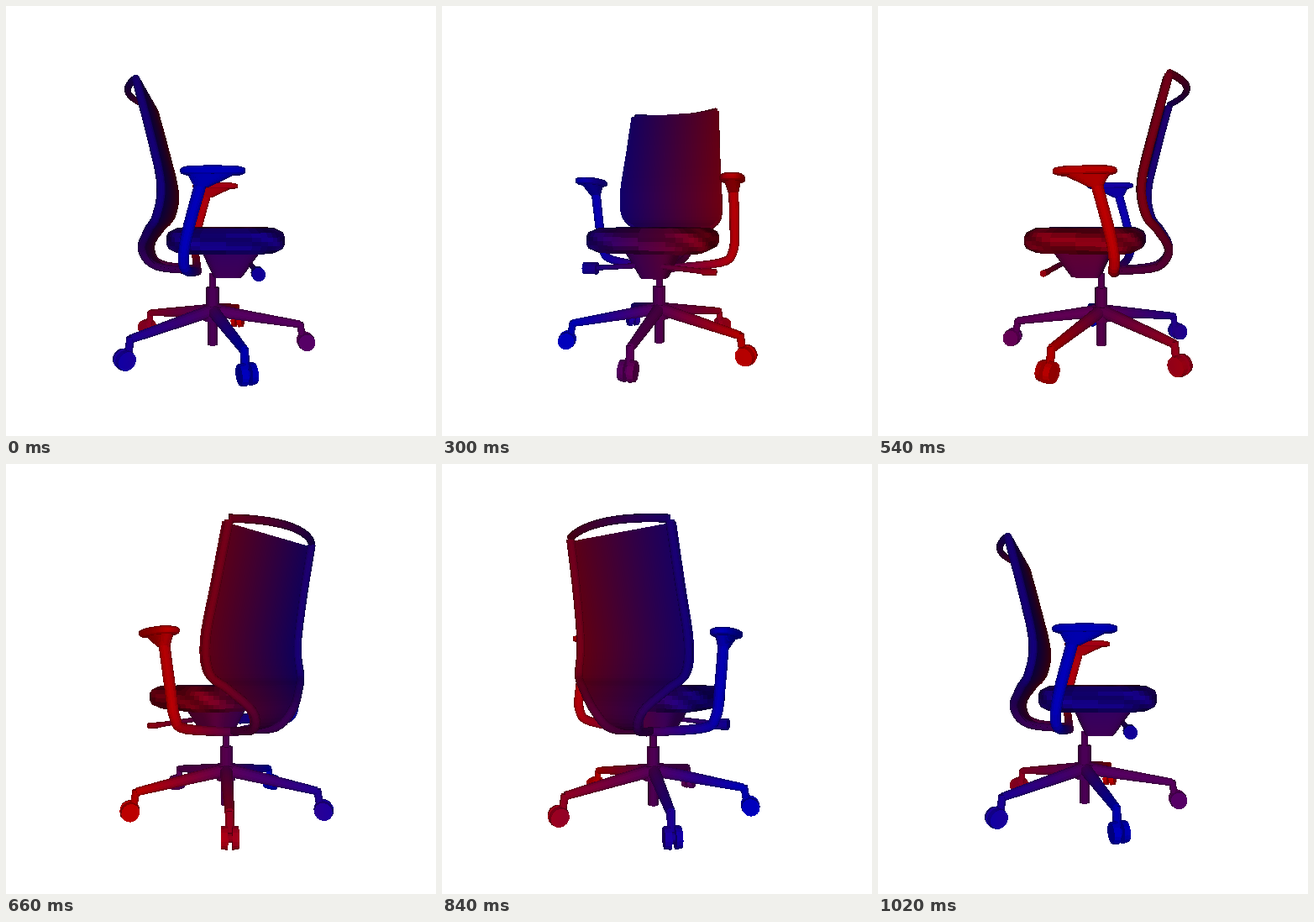
An HTML page with a canvas for the animation above (1080 ms loop, 512 by 512 pixels).

```html
<!DOCTYPE html>
<html>
<head>
<meta charset="utf-8">
<title>Turning office chair</title>
<style>
html, body { margin: 0; width: 100%; height: 100%; overflow: hidden; background: #fff; }
canvas { display: block; width: 512px; height: 512px; }
</style>
</head>
<body>
<canvas id="stage" width="512" height="512"></canvas>
<script>
// Points are [forward, down, side]; the camera sits at seat height.
const SIZE = 512, MID = 256, DIST = 490, STEP = 60, STEPS = 18, TAU = Math.PI * 2;
const ctx = document.getElementById('stage').getContext('2d');
const faces = [];

const sub = (a, b) => a.map((v, i) => v - b[i]);
const dot = (a, b) => a[0] * b[0] + a[1] * b[1] + a[2] * b[2];
const cross = (a, b) => [a[1] * b[2] - a[2] * b[1], a[2] * b[0] - a[0] * b[2], a[0] * b[1] - a[1] * b[0]];
const unit = a => { const n = Math.hypot(...a) || 1; return a.map(v => v / n); };
const mix = (a, b, t) => a + (b - a) * t;
// n + 1 samples of fn over 0..1
const sample = (n, fn) => Array.from({ length: n + 1 }, (_, i) => fn(i / n));

// Catmull-Rom curve through a few key points
function smooth(keys, n = 5) {
  const last = keys.length - 1, key = i => keys[Math.min(last, Math.max(0, i))];
  return sample(n * last, u => {
    const i = Math.min(last - 1, Math.floor(u * last)), t = u * last - i;
    return key(i).map((b, m) => {
      const a = key(i - 1)[m], c = key(i + 1)[m], d = key(i + 2)[m];
      return b + t / 2 * (c - a + t * (2 * a - 5 * b + 4 * c - d + t * (3 * (b - c) + d - a)));
    });
  });
}

function grid(rows, shade, vary = 0) {
  for (let i = 1; i < rows.length; i++)
    for (let j = 1; j < rows[i].length; j++) {
      const a = rows[i - 1][j - 1], b = rows[i - 1][j], c = rows[i][j], d = rows[i][j - 1];
      const k = shade * (1 + vary * Math.sin(i * 1.5 + j * 0.9));
      faces.push({ pts: [a, b, c], k }, { pts: [a, c, d], k });
    }
}

function closed(rings, first, last, shade, vary) {
  grid([rings[0].map(() => first), ...rings, rings[0].map(() => last)], shade, vary);
}

// Round bar along a path, tapering from r0 to r1
function tube(path, r0, r1, shade, ref = [1, 0, 0]) {
  const end = path.length - 1;
  const rings = path.map((p, i) => {
    const dir = unit(sub(path[Math.min(i + 1, end)], path[Math.max(i - 1, 0)]));
    const u = unit(cross(dir, ref)), v = cross(dir, u), r = mix(r0, r1, i / end);
    return sample(16, t => p.map((x, m) =>
      x + r * (Math.cos(t * TAU) * u[m] + Math.sin(t * TAU) * v[m])));
  });
  closed(rings, path[0], path[end], shade);
}

// Stacked rounded rectangles: [forward, height, half length, half width]
function loft(levels, side, power, shade, vary) {
  const bend = v => Math.sign(v) * Math.abs(v) ** (2 / power);
  const rings = levels.map(([f, y, rf, rl]) => sample(48, t =>
    [f + rf * bend(Math.cos(t * TAU)), y, side + rl * bend(Math.sin(t * TAU))]));
  const centre = ([f, y]) => [f, y, side];
  closed(rings, centre(levels[0]), centre(levels.at(-1)), shade, vary);
}

// Slab with rounded rims
function cushion(f, top, bottom, rf, rl, side, power, shade, vary) {
  loft(sample(6, t => {
    const r = 1 - 0.16 * (2 * t - 1) ** 4;
    return [f, mix(top, bottom, t), rf * r, rl * r];
  }), side, power, shade, vary);
}

function buildBack() {
  const spine = smooth([
    [-84, -148, 62], [-69, -92, 65], [-57, -38, 69], [-62, -5, 68],
    [-73, 10, 54], [-84, 32, 32], [-70, 52, 20], [-25, 58, 12]
  ]);
  grid(spine.map(([f, y, l]) => sample(12, t => [f, y, l * (2 * t - 1)])), 0.5);
  for (const side of [-1, 1])
    tube(spine.map(([f, y, l]) => [f - 5, y, side * (l - 4)]), 4.5, 4.5, 0.56, [0, 0, 1]);
  tube(sample(16, t => [-89 - 80 * t * (1 - t), -150, mix(-58, 58, t)]), 3.8, 3.8, 0.5, [0, 1, 0]);
}

function buildSeat() {
  cushion(5, 8, 35, 66, 71, 0, 4.5, 0.55, 0.2);
  loft([[12, 33, 36, 30], [8, 66, 17, 15]], 0, 4, 0.62);
}

function buildArm(side) {
  const l = 88 * side;
  cushion(-8, -53, -45, 32, 14, l, 2.6, 0.72);
  loft([[-9, -46, 24, 9], [-19, -33, 7, 6]], l, 2.4, 0.68);
  tube(smooth([[-20, -36, l], [-33, 12, l], [-37, 38, 0.97 * l], [-34, 51, 0.8 * l], [-28, 60, 0]]),
    6, 5, 0.74);
  // Adjusting lever below the seat
  const grip = side > 0 ? 7 : 3.5;
  tube([[34, 50, 15 * side], [38, 54, 66 * side]], 3, 3, 0.62);
  tube([[38, 54, 60 * side], [38, 54, 76 * side]], grip, grip, 0.66);
}

function buildLeg(turn) {
  const c = Math.cos(turn), s = Math.sin(turn);
  const at = (y, r, w = 0) => [-10 + r * c - w * s, y, r * s + w * c];
  tube(sample(4, t => at(mix(107, 123, t), mix(5, 104, t))), 7.5, 4.5, 0.72, [0, 1, 0]);
  tube([at(121, 104), at(139, 107)], 4.2, 4.2, 0.7, [s, 0, -c]);
  tube([at(143, 111, -3), at(143, 111, 3)], 4, 4, 0.7, [0, 1, 0]);
  for (const w of [-1, 1])
    tube([at(143, 111, 2 * w), at(143, 111, 8 * w)], 10.6, 9.6, 0.76, [0, 1, 0]);
}

function buildBase() {
  const pole = (top, bottom, r) => tube([[-10, top, 0], [-10, bottom, 0]], r, r, 0.64);
  pole(62, 80, 4);
  pole(79, 104, 7.5);
  pole(101, 118, 11);
  pole(118, 147, 6);
  for (let k = 0; k < 5; k++) buildLeg(k * TAU / 5);
}

function render(angle) {
  const cos = Math.cos(angle), sin = Math.sin(angle);
  const image = ctx.createImageData(SIZE, SIZE), px = image.data.fill(255);
  const near = new Float32Array(SIZE * SIZE);
  for (const { pts, k } of faces) {
    const cam = pts.map(([f, y, l]) => [f * cos - l * sin, y, f * sin + l * cos]);
    const [a, b, c] = cam.map(([x, y, z]) => {
      const s = DIST / (DIST - z);
      return [MID + x * s, MID + y * s, s];
    });
    const area = (b[0] - a[0]) * (c[1] - a[1]) - (c[0] - a[0]) * (b[1] - a[1]);
    if (Math.abs(area) < 1e-6) continue;
    const normal = unit(cross(sub(cam[1], cam[0]), sub(cam[2], cam[0])));
    const facing = Math.abs(dot(normal, unit(sub([0, 0, DIST], cam[0]))));
    const light = 255 * k * (0.45 + 0.55 * facing);
    const xs = [a[0], b[0], c[0]], ys = [a[1], b[1], c[1]];
    const x0 = Math.floor(Math.min(...xs)), x1 = Math.ceil(Math.max(...xs));
    const y0 = Math.floor(Math.min(...ys)), y1 = Math.ceil(Math.max(...ys));
    for (let y = y0; y <= y1; y++)
      for (let x = x0; x <= x1; x++) {
        const dx = x + 0.5 - a[0], dy = y + 0.5 - a[1];
        const v = (dx * (c[1] - a[1]) - dy * (c[0] - a[0])) / area;
        const w = (dy * (b[0] - a[0]) - dx * (b[1] - a[1])) / area;
        const u = 1 - v - w;
        if (u < 0 || v < 0 || w < 0) continue;
        const depth = u * a[2] + v * b[2] + w * c[2], i = y * SIZE + x;
        if (depth <= near[i]) continue;
        near[i] = depth;
        // Red on one side of the chair, blue on the other
        const side = u * pts[0][2] + v * pts[1][2] + w * pts[2][2];
        const blue = Math.min(1, Math.max(0, 0.5 + side / 190));
        px[i * 4] = light * (1 - blue);
        px[i * 4 + 1] = 0;
        px[i * 4 + 2] = light * blue;
      }
  }
  return image;
}

buildBack();
buildSeat();
buildArm(-1);
buildArm(1);
buildBase();

const views = [];
let shown = -1;
const start = performance.now();

function draw() {
  const step = Math.floor((performance.now() - start) / STEP) % STEPS;
  if (step !== shown) {
    views[step] ??= render(step / (STEPS - 1) * TAU);
    ctx.putImageData(views[step], 0, 0);
    shown = step;
  }
  requestAnimationFrame(draw);
}
draw();
</script>
</body>
</html>
```
